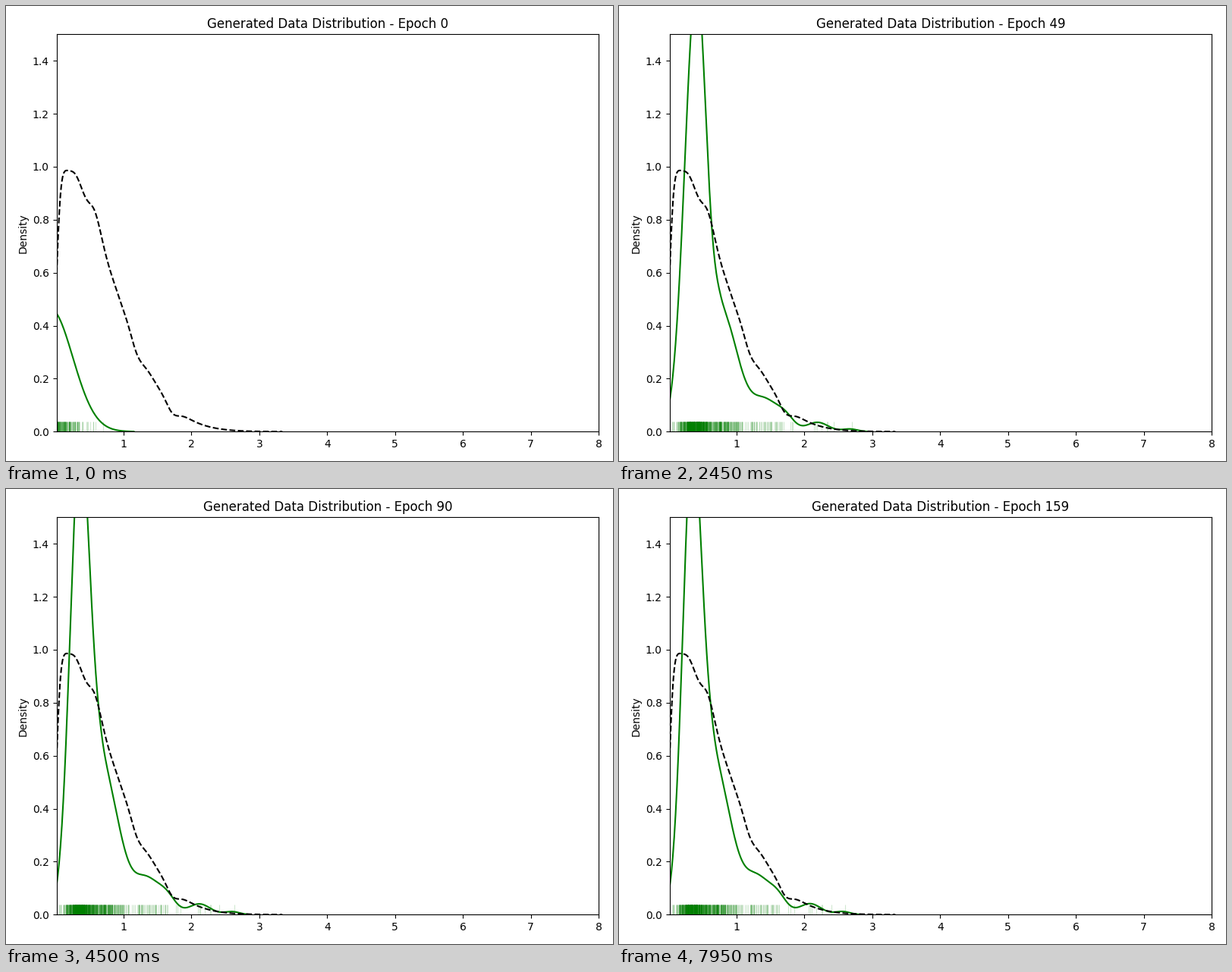
A matplotlib script that plays this animation: 800x600 px, repeating every 8000 ms.

```python
import numpy as np
import matplotlib.pyplot as plt
from matplotlib.animation import FuncAnimation

FRAMES, INTERVAL = 160, 50
GRID = np.arange(-3, 3.4, 0.01)
DRAWS = np.sort(np.random.default_rng(7).random(700))
RUG_HEIGHT = 0.025

# epoch: peak centre, left width, right width, height,
#        shoulder centre and height, tail centre and height
POSES = {
    0: (-0.08, 0.80, 0.33, 0.464, 0.30, 0.00, 0.60, 0.000),
    33: (0.355, 0.19, 0.135, 1.62, 0.68, 0.41, 1.41, 0.095),
    49: (0.405, 0.17, 0.141, 1.66, 0.77, 0.45, 1.42, 0.110),
    76: (0.360, 0.15, 0.141, 1.70, 0.68, 0.55, 1.36, 0.125),
    159: (0.343, 0.14, 0.141, 1.70, 0.665, 0.56, 1.31, 0.130),
}
EPOCHS = np.array(list(POSES))


def bump(x, centre, left, right, height):
    """Gaussian with its own width on each side."""
    return height * np.exp(-0.5 * ((x - centre)
                                   / np.where(x < centre, left, right)) ** 2)


def real_density(x):
    """Half normal with a softened start and slight sampling waves."""
    steps = np.linspace(-4, 4, 400)
    edge = np.cumsum(np.exp(-0.5 * steps ** 2))
    y = np.exp(-0.5 * (x / 0.8) ** 2) * np.interp(x / 0.055, steps,
                                                  edge / edge[-1])
    for centre, height in ((0.3, 0.035), (0.58, 0.06),
                           (1.2, -0.035), (1.72, -0.03)):
        y += bump(x, centre, 0.08, 0.09, height)
    return y


def pose(epoch):
    k = min(np.searchsorted(EPOCHS, epoch, side="right"), len(EPOCHS) - 1)
    start, end = EPOCHS[k - 1], EPOCHS[k]
    t = 1 - (1 - (epoch - start) / (end - start)) ** 2
    a, b = np.array(POSES[start]), np.array(POSES[end])
    return a + (b - a) * t


def made_density(x, p, tight=1.0):
    """Peak, shoulder and a rippling tail; tight < 1 narrows every part."""
    mu, left, right, height, mid, mid_height, tail, tail_height = p
    parts = [(mu, left, right, height), (mid, 0.17, 0.25, mid_height)]
    for gap, width, share in ((0, 0.19, 1), (0.3, 0.13, 0.42),
                              (0.77, 0.16, 0.32), (1.25, 0.11, 0.09)):
        parts.append((tail + gap, width, width, tail_height * share))
    return sum(bump(x, c, l * tight, r * tight, h / tight)
               for c, l, r, h in parts)


def rug_ticks(p):
    mass = np.cumsum(made_density(GRID, p, 0.8))
    return np.interp(DRAWS, mass / mass[-1], GRID)


fig, ax = plt.subplots(figsize=(8, 6), dpi=100)
ax.set_xticks(range(1, 9))
ax.set_ylabel("Density")
title = ax.set_title("Generated Data Distribution - Epoch 0")
curve, = ax.plot([], [], color="green", lw=1.5)
real_x = np.arange(-0.16, 3.35, 0.01)
ax.plot(real_x, real_density(real_x), "k--", lw=1.5)
rug = ax.vlines(np.zeros(len(DRAWS)), 0, RUG_HEIGHT, color="green",
                lw=0.8, alpha=0.18, transform=ax.get_xaxis_transform())
ax.set_xlim(0.01, 8)
ax.set_ylim(0, 1.5)
fig.tight_layout()
fig.subplots_adjust(left=66.5 / 800, right=781 / 800)


def update(epoch):
    p = pose(epoch)
    y = made_density(GRID, p)
    curve.set_data(GRID, np.where(y > 4e-4, y, np.nan))
    rug.set_segments([[(x, 0), (x, RUG_HEIGHT)]
                      for x in rug_ticks(p) if x > 0])
    title.set_text(f"Generated Data Distribution - Epoch {epoch}")
    return curve, rug, title


anim = FuncAnimation(fig, update, frames=FRAMES, interval=INTERVAL,
                     repeat=True, repeat_delay=0, blit=False)
plt.show()
```
